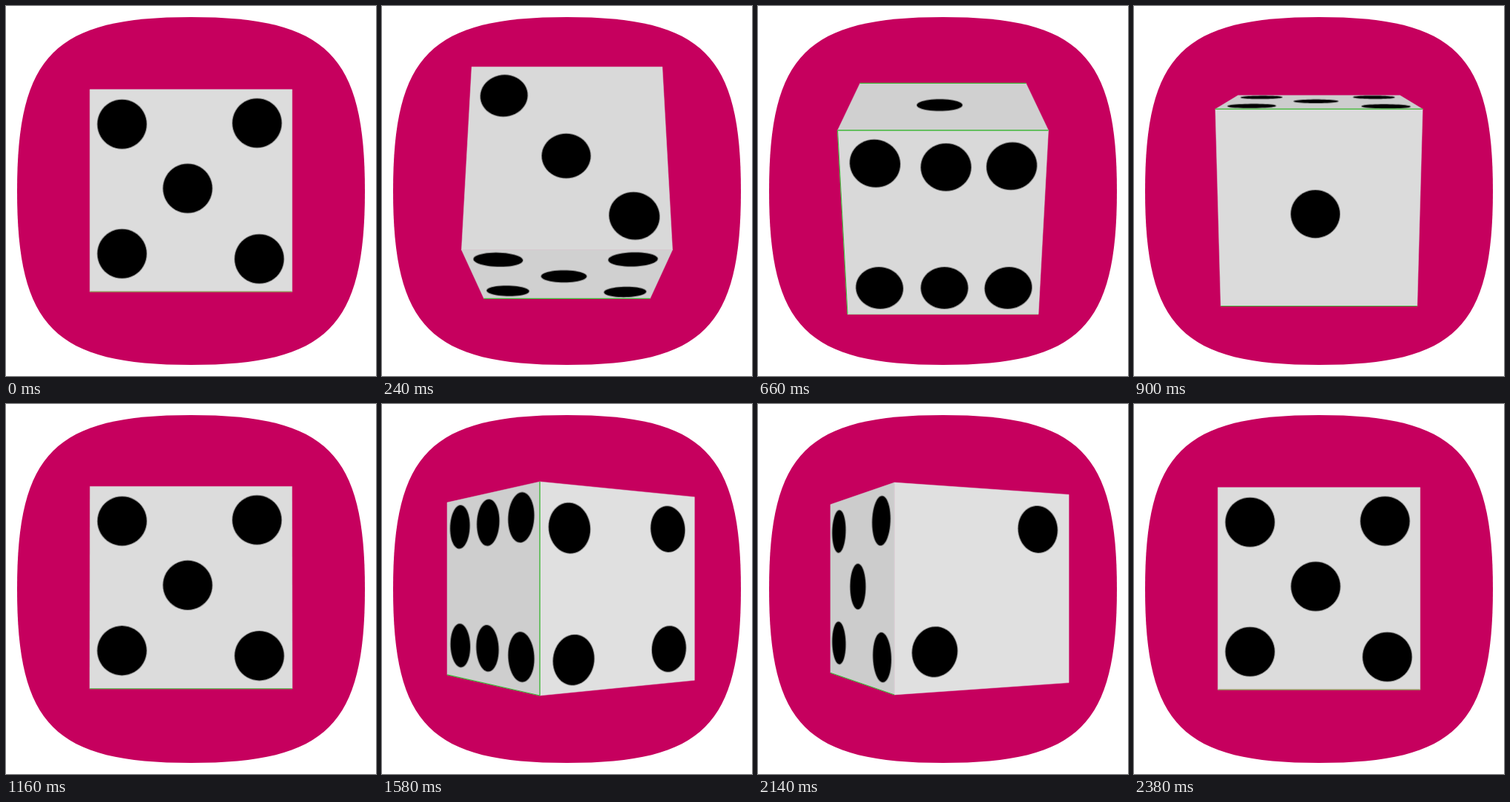
Write an HTML page with a canvas that moves like this. It is 500 px wide and 500 px high and loops after 2400 ms.

```html
<!DOCTYPE html>
<html lang="en">
<head>
<meta charset="utf-8">
<title>Rolling die</title>
<style>
  html, body { margin: 0; width: 100%; height: 100%; overflow: hidden; background: #fff; }
  canvas { display: block; width: 100vmin; height: 100vmin; }
</style>
</head>
<body>
<canvas id="stage" width="500" height="500"></canvas>
<script>
const ctx = document.getElementById('stage').getContext('2d');
const LOOP = 2400, STEP = 20;
const CX = 250, CY = 249.5, FOCAL = 984, DISTANCE = 8.2, PIP = 0.242;
const GREEN = '#43b83a', OLIVE = '#8c8445', PALE = '#b4d3b0';

const five = [[-.682, -.657], [.653, -.668], [-.033, -.022], [-.682, .624], [.675, .675]];
const six = [[-.656, -.665], [.029, -.627], [.664, -.638], [-.655, .693], [.015, .693], [.674, .693]];
const sixTurned = six.map(([u, v]) => [-u, -v]);

const EDGES = {
  top: [-1, -1, 1, -1], bottom: [-1, 1, 1, 1],
  left: [-1, -1, -1, 1], right: [1, -1, 1, 1]
};

// Faces in the order they roll into view, 90 degrees apart.
const tumble = [
  { pips: five, edges: { bottom: GREEN } },
  { pips: [[-.65, -.659], [-.008, .022], [.65, .656]], edges: {} },
  { pips: six, edges: { top: GREEN, left: GREEN, bottom: PALE } },
  { pips: [[-.036, .04]], edges: { top: GREEN, bottom: GREEN } }
];
const spin = [
  { pips: five, edges: { bottom: GREEN } },
  { pips: [[-.658, -.582], [.613, -.631], [-.609, .688], [.629, .64]], edges: { left: GREEN } },
  { pips: sixTurned, edges: { bottom: GREEN, right: GREEN } },
  { pips: [[.611, -.616], [-.575, .612]], edges: {} }
];

// Half a turn: leaves rest quickly, slows a little towards the middle.
const halfTurn = u => u * u * (3.6 - 4 * u + 1.4 * u * u);

function turn(t, start, middle, end) {
  if (t <= start || t >= end) return 0;
  return Math.PI * (t < middle
    ? halfTurn((t - start) / (middle - start))
    : 2 - halfTurn((end - t) / (end - middle)));
}

function project(x, y, z) {
  const s = FOCAL / (DISTANCE - z);
  return [CX + x * s, CY + y * s];
}

function placeFace(angle, vertical) {
  const s = Math.sin(angle), c = Math.cos(angle);
  return vertical
    ? (u, v) => project(u, s + v * c, c - v * s)
    : (u, v) => project(s + u * c, v, c - u * s);
}

function trace(points) {
  ctx.beginPath();
  points.forEach(p => ctx.lineTo(...p));
}

function drawFace(face, place, shade) {
  trace([place(-1, -1), place(1, -1), place(1, 1), place(-1, 1)]);
  ctx.closePath();
  ctx.fillStyle = ctx.strokeStyle = `rgb(${shade},${shade},${shade})`;
  ctx.fill();
  ctx.lineWidth = 0.5;
  ctx.stroke();

  // The translucent outline softens the rim of each pip.
  ctx.fillStyle = '#000';
  ctx.strokeStyle = 'rgba(0,0,0,.35)';
  ctx.lineWidth = 2;
  for (const [u, v] of face.pips) {
    trace(Array.from({ length: 48 }, (_, i) => {
      const a = i * Math.PI / 24;
      return place(u + PIP * Math.cos(a), v + PIP * Math.sin(a));
    }));
    ctx.closePath();
    ctx.fill();
    ctx.stroke();
  }
}

function drawDie(faces, theta, vertical) {
  const visible = faces
    .map((face, i) => ({ face, angle: theta - i * Math.PI / 2 }))
    .filter(f => Math.cos(f.angle) > 1 / DISTANCE)
    .map(f => ({ ...f, place: placeFace(f.angle, vertical) }));

  for (const { face, angle, place } of visible) {
    const s = Math.sin(angle);
    const side = vertical ? -5 * Math.abs(s) : 10.8 * s;
    drawFace(face, place, Math.round(208 + side + 12 * Math.cos(angle)));
  }
  ctx.lineWidth = 1.1;
  for (const { face, place } of visible) {
    for (const [name, color] of Object.entries(face.edges)) {
      const [u0, v0, u1, v1] = EDGES[name];
      trace([place(u0, v0), place(u1, v1)]);
      ctx.strokeStyle = theta === 0 ? OLIVE : color;
      ctx.stroke();
    }
  }
}

function drawBackdrop() {
  const lo = 15, hi = 485, a = 66, b = 434, mid = 250;
  ctx.fillStyle = '#fff';
  ctx.fillRect(0, 0, 500, 500);
  ctx.fillStyle = '#c6005e';
  ctx.beginPath();
  ctx.moveTo(lo, mid);
  ctx.bezierCurveTo(lo, a, a, lo, mid, lo);
  ctx.bezierCurveTo(b, lo, hi, a, hi, mid);
  ctx.bezierCurveTo(hi, b, b, hi, mid, hi);
  ctx.bezierCurveTo(a, hi, lo, b, lo, mid);
  ctx.fill();
}

function frame() {
  const t = Math.floor(performance.now() % LOOP / STEP) * STEP;
  drawBackdrop();
  if (t < 1180) drawDie(tumble, turn(t, 0, 574, 1180), true);
  else drawDie(spin, turn(t, 1180, 1779, 2380), false);
  requestAnimationFrame(frame);
}
frame();
</script>
</body>
</html>
```
